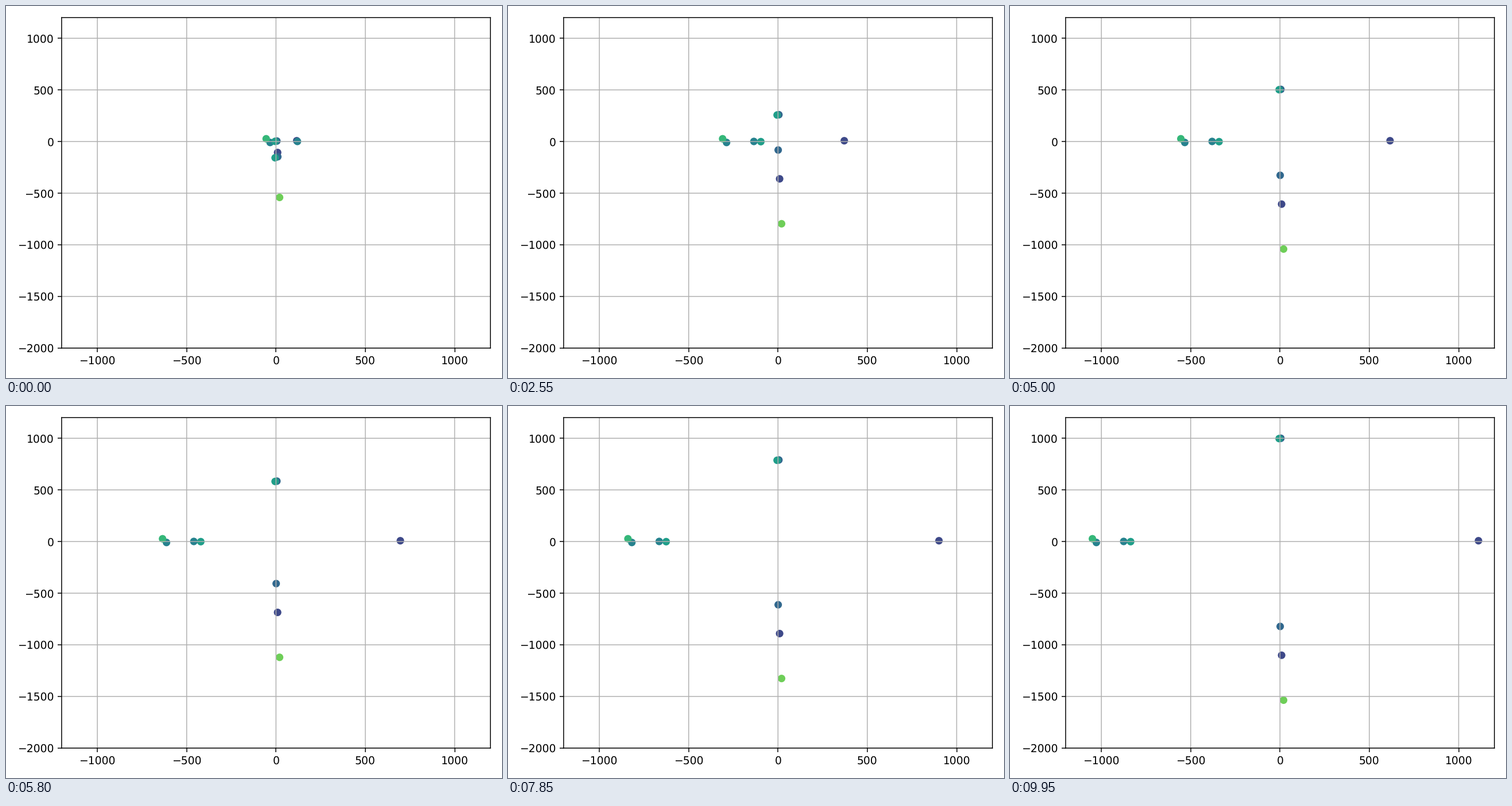
A matplotlib script that plays this animation: 864 by 648 pixels, repeating every 10000 ms.

```python
import numpy as np
import matplotlib.pyplot as plt
from matplotlib.animation import FuncAnimation

WIDTH, HEIGHT, DPI = 864, 648, 135
FRAMES = 200
SPEED = 5
TURN = 33  # step at which the two turning dots leave the northbound road

# Where each dot ends up (x + yj), grouped by colour level.
ENDS = {
    2: [1111 + 8j, 9 - 1101j],
    3: [5 + 1000j, 1 - 822j],
    4: [-1028 - 9j, -875 + 1j],
    5: [-5 + 997j, -836 - 1j],
    6: [-1050 + 27j],
    7: [20 - 1536j],
}
# Point on the northbound road where a dot turns, by its end point.
CORNERS = {1 - 822j: 10 + 18j, -836 - 1j: -5 + 8j}

# Smooth outlines: no snapping to whole pixels, no glyph hinting.
plt.rcParams["path.snap"] = False
plt.rcParams["text.hinting"] = "none"


def heading(end):
    """Unit step away from the centre along the dominant axis."""
    if abs(end.real) > abs(end.imag):
        return np.sign(end.real)
    return 1j * np.sign(end.imag)


def position(end, step):
    if end in CORNERS and step < TURN:
        return CORNERS[end] + 1j * SPEED * (step - TURN)
    return end - heading(end) * SPEED * (FRAMES - 1 - step)


def offsets(step):
    points = np.array([position(end, step)
                       for group in ENDS.values() for end in group])
    return np.column_stack([points.real, points.imag])


fig, ax = plt.subplots(figsize=(WIDTH / DPI, HEIGHT / DPI), dpi=DPI)
fig.subplots_adjust(left=96.9 / WIDTH, right=843.75 / WIDTH,
                    bottom=1 - 595.9 / HEIGHT, top=1 - 20.25 / HEIGHT)
ax.set_xlim(-1200, 1200)
ax.set_ylim(-2000, 1200)
ax.grid(True)

levels = [level for level, group in ENDS.items() for _ in group]
dots = ax.scatter(*offsets(0).T, c=levels, cmap="viridis", vmin=0, vmax=9)


def update(step):
    dots.set_offsets(offsets(step))
    return (dots,)


anim = FuncAnimation(fig, update, frames=FRAMES, interval=50,
                     repeat=True, repeat_delay=0)
plt.show()
```
